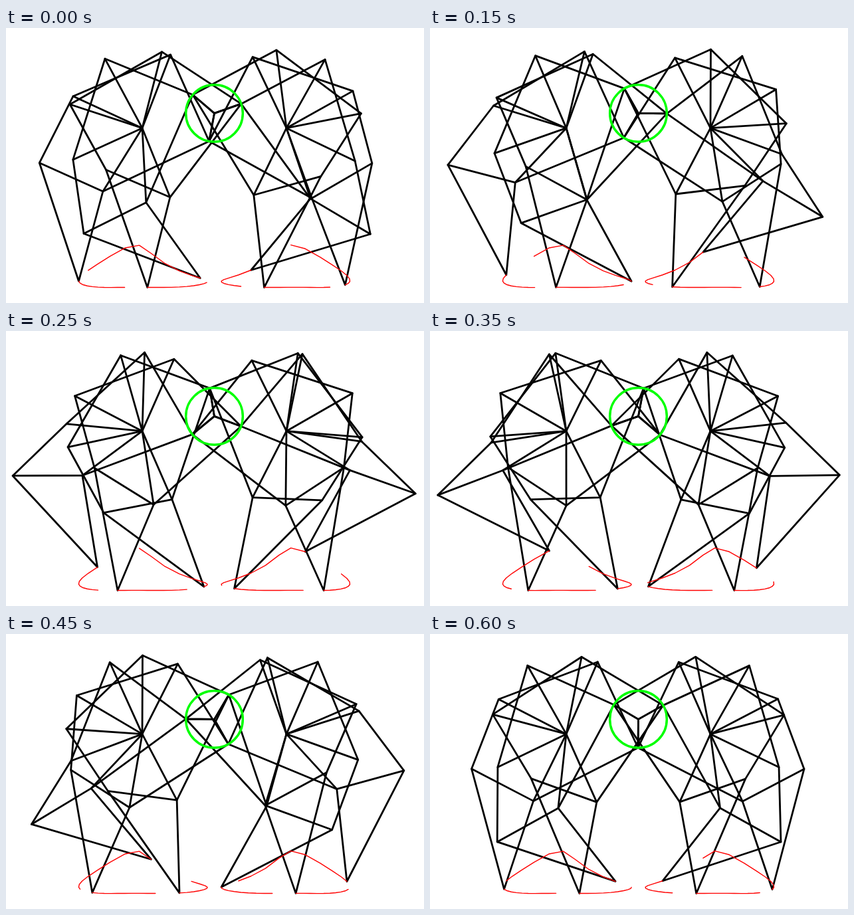
Write an HTML page with a canvas that moves like this. It is 629 px wide and 414 px high and loops after 0.65 s.

```html
<!DOCTYPE html>
<html lang="en">
<head>
<meta charset="utf-8">
<title>Walking linkage</title>
<style>
  html, body { margin: 0; width: 100%; height: 100%; overflow: hidden; background: #fff; }
  canvas { display: block; }
</style>
</head>
<body>
<canvas id="stage" width="629" height="414"></canvas>
<script>
const ctx = document.getElementById('stage').getContext('2d');
const LOOP = 650, STEP = 50, START = 100.6, TURN = 10, TRAIL = 10;
const SCALE = 2.855;
const HUB = { x: 313.5, y: 128.4 };

// Rod lengths of the leg, in linkage units
const ROD = { b: 41.5, c: 39.3, d: 40.1, e: 55.8, f: 39.4, g: 36.7, h: 65.7, i: 49, j: 50, k: 61.9, m: 15 };
const PIVOT = { x: 38, y: 7.8 };

// Point at distance rp from p and rq from q, on the chosen side of p->q
function meet(p, q, rp, rq, side) {
  const dx = q.x - p.x, dy = q.y - p.y, d = Math.hypot(dx, dy);
  const along = (rp * rp - rq * rq + d * d) / (2 * d);
  const off = side * Math.sqrt(Math.max(0, rp * rp - along * along));
  return { x: p.x + (along * dx - off * dy) / d, y: p.y + (along * dy + off * dx) / d };
}

// Joints of one leg; flip is 1 for the right side and -1 for the left
function solveLeg(degrees, flip) {
  const a = degrees * Math.PI / 180;
  const crank = { x: flip * ROD.m * Math.cos(a), y: ROD.m * Math.sin(a) };
  const top = meet(crank, PIVOT, ROD.j, ROD.b, -1);
  const low = meet(crank, PIVOT, ROD.k, ROD.c, 1);
  const back = meet(top, PIVOT, ROD.e, ROD.d, -1);
  const knee = meet(back, low, ROD.f, ROD.g, -1);
  const foot = meet(knee, low, ROD.h, ROD.i, -1);
  const place = p => ({ x: HUB.x + flip * SCALE * p.x, y: HUB.y + SCALE * p.y });
  return {
    crank: place(crank), pivot: place(PIVOT), top: place(top), low: place(low),
    back: place(back), knee: place(knee), foot: place(foot)
  };
}

function line(points) {
  ctx.beginPath();
  points.forEach(p => ctx.lineTo(p.x, p.y));
  ctx.stroke();
}

function pen(color, width) {
  ctx.strokeStyle = color;
  ctx.lineWidth = width;
}

function drawLeg(degrees, flip) {
  const { crank, pivot, top, low, back, knee, foot } = solveLeg(degrees, flip);
  line([HUB, crank, top, back, knee, foot, low, crank]);
  line([top, pivot, back]);
  line([pivot, low, knee]);
}

function drawTrail(degrees, flip) {
  const points = [];
  for (let n = TRAIL - 1; n >= 0; n--) points.push(solveLeg(degrees - n * TURN, flip).foot);
  line(points);
}

function eachLeg(angle, draw) {
  for (const flip of [-1, 1])
    for (const phase of [0, 120, 240]) draw(angle + phase, flip);
}

function render(time) {
  const step = Math.floor((time % LOOP) / STEP);
  // The opening pose is held for two steps
  const angle = START + TURN * Math.max(0, step - 1);

  ctx.fillStyle = '#fff';
  ctx.fillRect(0, 0, 629, 414);
  ctx.lineCap = ctx.lineJoin = 'round';

  pen('#000', 2.8);
  eachLeg(angle, drawLeg);
  pen('#f00', 1.4);
  eachLeg(angle, drawTrail);

  pen('#0f0', 3.5);
  ctx.beginPath();
  ctx.arc(HUB.x, HUB.y, ROD.m * SCALE, 0, 2 * Math.PI);
  ctx.stroke();
}

const start = performance.now();
function tick() {
  render(performance.now() - start);
  requestAnimationFrame(tick);
}
tick();
</script>
</body>
</html>
```
